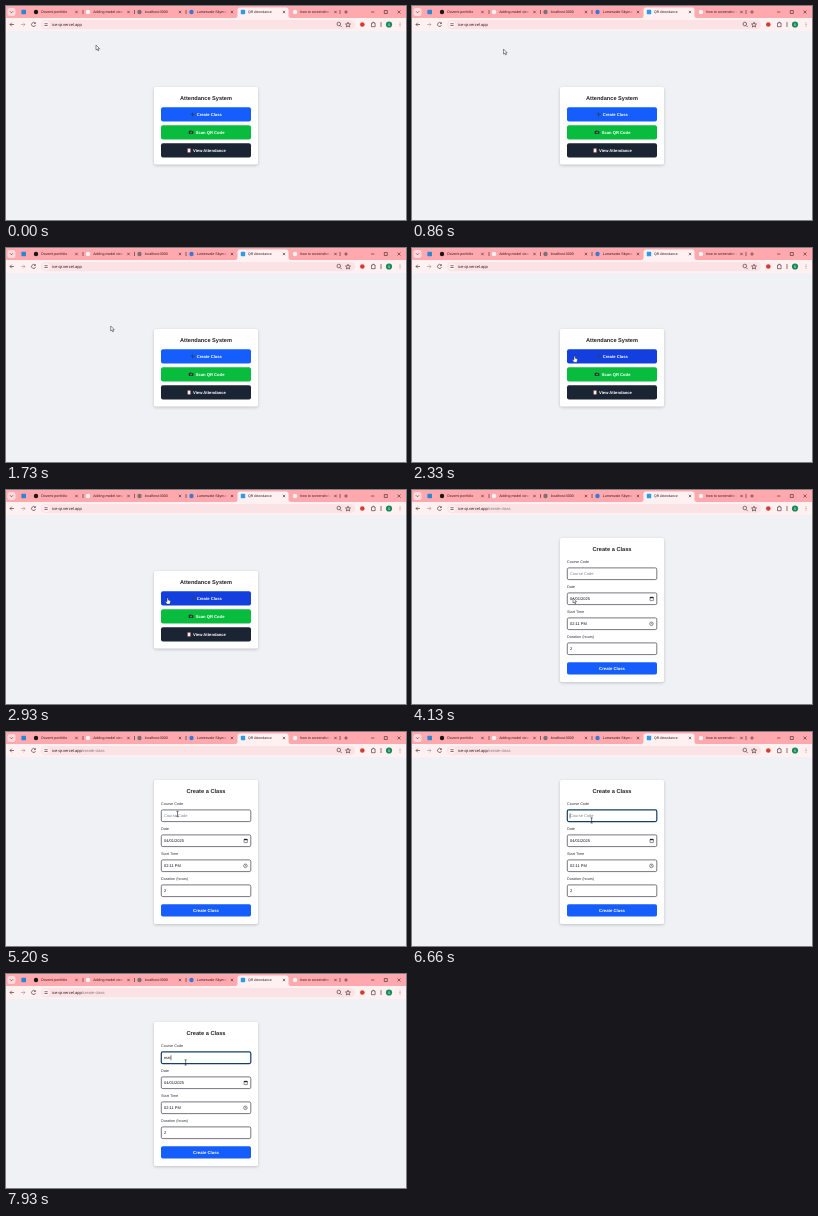
These frames come from a looping animation (400x214 px, 8 s). An HTML page:

```html
<!DOCTYPE html>
<html lang="en">
<head>
<meta charset="utf-8">
<title>Attendance System</title>
<style>
  html, body { margin: 0; height: 100%; overflow: hidden; background: #eff1f5; }
  svg { display: block; width: 100vw; height: 100vh; }
  text { font-family: "Liberation Sans", Arial, sans-serif; text-rendering: geometricPrecision; }
  .line { fill: none; stroke: #4b3034; stroke-width: .65; }
  .card { fill: #fff; filter: drop-shadow(0 1.2px 1.4px #0003); }
</style>
</head>
<body>
<svg id="stage" viewBox="0 0 400 214">
  <defs>
    <linearGradient id="fade">
      <stop offset="0" stop-color="#ffa8ae" stop-opacity="0"/>
      <stop offset="1" stop-color="#ffa8ae"/>
    </linearGradient>
  </defs>
  <g id="browser"></g>
  <g id="home"></g>
  <g id="form"></g>
  <g id="cursors">
    <path id="arrow" d="M0 0V5L1.2 4L2 5.8L2.9 5.4L2.1 3.7H3.6Z" fill="#fff" stroke="#222" stroke-width=".5"/>
    <path id="hand" d="M-.6 .2Q0 -.5 .6 .2V2L2.4 2.5Q3 2.8 2.8 3.7L2.3 6H-.8L-2.2 3.7Q-2 2.9 -1.4 3.3L-.6 4Z" fill="#fff" stroke="#222" stroke-width=".4"/>
    <path id="beam" d="M-1.1 -2.6H1.1M0 -2.6V2.6M-1.1 2.6H1.1" fill="none" stroke="#222" stroke-width=".6"/>
  </g>
</svg>
<script>
const $ = id => document.getElementById(id);
const rect = (x, y, w, h, fill, r = 0, extra = '') =>
  `<rect x="${x}" y="${y}" width="${w}" height="${h}" rx="${r}" fill="${fill}" ${extra}/>`;
const dot = (x, y, r, fill) => `<circle cx="${x}" cy="${y}" r="${r}" fill="${fill}"/>`;
const line = d => `<path class="line" d="${d}"/>`;
const text = (x, y, size, label, fill = '#222', extra = '') =>
  `<text x="${x}" y="${y}" font-size="${size}" fill="${fill}" ${extra}>${label}</text>`;
const heading = (y, size, label, fill) =>
  text(200, y, size, label, fill, 'text-anchor="middle" font-weight="700"');
const cross = (x, y, r = 1.2) => line(`M${x - r} ${y - r}L${x + r} ${y + r}M${x + r} ${y - r}L${x - r} ${y + r}`);

// Browser window
function tab(x, label, iconColor, closeX) {
  return dot(x, 6, 2.2, iconColor) + text(x + 5.2, 7.3, 3.6, label, '#33191c')
    + rect(closeX - 10, 2, 5, 8, 'url(#fade)') + rect(closeX - 5, 2, 8, 8, '#ffa8ae') + cross(closeX, 6);
}
const separators = [77, 128.5, 180, 334].map(x => line(`M${x} 4V8`)).join('');

$('browser').innerHTML =
  rect(0, 0, 400, 12, '#ffa8ae') + rect(0, 12, 400, 13, '#fff1f2') + rect(0, 25, 400, 189, '#eff1f5')
  + rect(1.5, 2, 8, 8, '#ffd9dc', 2.5) + line('M4 5.3L5.5 6.8L7 5.3')
  + rect(15.4, 3.7, 4.6, 4.6, '#2c86d8', .7)
  + tab(30, 'Dovemi portfolio', '#171717', 70.5)
  + tab(82, 'Adding model view', '#f4f4f4', 122.5)
  + tab(133.5, 'localhost:3000', '#7b7175', 174)
  + tab(185.5, 'Lumenvale Skymate: Y', '#3978d8', 226)
  + separators
  + '<path d="M229 12Q231.5 12 231.5 9.5V4Q231.5 1.5 234 1.5H280Q282.5 1.5 282.5 4V9.5Q282.5 12 285 12Z" fill="#fff1f2"/>'
  + rect(234.8, 3.8, 4.4, 4.4, '#2d9be8', .6) + text(242, 7.3, 3.5, 'QR Attendance', '#33191c') + cross(278, 6)
  + tab(289, 'how to screenshot on', '#f6f3f3', 329.5)
  + line('M338.2 6H341.8M340 4.2V7.8M365 6H368.4M378.3 4.5H381.3V7.5H378.3Z') + cross(393, 6, 1.5)
  + line('M8 18.5H4M5.8 16.7L4 18.5L5.8 20.3')
  + '<g opacity=".45">' + line('M15 18.5H19M17.2 16.7L19 18.5L17.2 20.3') + '</g>'
  + line('M29.2 17.3A2 2 0 1 0 29.5 19M29.4 16.2V17.6H28')
  + rect(35, 14, 314, 9.2, '#fbe2e4', 4.6) + dot(40, 18.6, 3.4, '#fff1f2')
  + line('M38.4 17.7H41.7M38.4 19.5H41.7')
  + text(46, 20, 4.06, 'ice-qr.vercel.app<tspan id="path" fill="#8b7478">/create-class</tspan>', '#30191c')
  + line('M334.2 19.6L335.7 21.1M334.6 18A1.8 1.8 0 1 1 331 18A1.8 1.8 0 1 1 334.6 18')
  + line('M342 16.2L342.7 17.9L344.5 18L343.1 19.2L343.6 21L342 20L340.4 21L340.9 19.2L339.5 18L341.3 17.9Z')
  + dot(356.3, 18.5, 2.3, '#d83b2d')
  + line('M365.5 17.1H366.8V16.2H368V17.1H369.1V20.7H365.5Z') + line('M375 16V21')
  + dot(383, 18.5, 3.1, '#178a58') + text(383, 19.8, 3.5, 'S', '#fff', 'text-anchor="middle"')
  + [16.9, 18.5, 20.1].map(y => dot(394, y, .45, '#4b3034')).join('');

// Start page
const button = (y, h, fill, label, x, id = '') =>
  rect(155, y, 90, h, fill, 2, id && `id="${id}"`) + text(x, y + h / 2 + 1.5, 4.15, label, '#fff', 'font-weight="700"');

$('home').innerHTML =
  rect(148, 81, 104, 77.5, '#fff', 1.8, 'class="card"') + heading(94, 5.6, 'Attendance System')
  + button(101.2, 14.3, '#155dfc', 'Create Class', 190.7, 'create')
  + '<path d="M184.7 108.4H188.5M186.6 106.5V110.3" stroke="#33425c" stroke-width=".9"/>'
  + button(119.2, 14.3, '#08bd3d', 'Scan QR Code', 189.7)
  + rect(182.7, 125, 4.6, 3.1, '#26352d', .5) + rect(183.8, 124.4, 1.5, 1, '#26352d') + dot(185, 126.6, 1, '#6c8277')
  + button(137.2, 14.3, '#1b2432', 'View Attendance', 187)
  + rect(181.4, 142.2, 3.3, 4.4, '#b8746a', .4) + rect(181.9, 142.9, 2.3, 3.3, '#f0f0f0');

// Class form
const field = (y, label, value, id = '') =>
  text(155, y - 5.3, 3.75, label, '#30343b')
  + rect(155.3, y, 89.5, 11.7, '#fff', 1.5, `stroke="#3c4048" stroke-width=".7" ${id && `id="${id}"`}`)
  + text(158, y + 7.2, 4, value, '#111', id && `id="${id}Text"`);

$('form').innerHTML =
  rect(148, 48, 104, 144, '#fff', 1.8, 'class="card"') + heading(61, 5.66, 'Create a Class')
  + field(77.9, 'Course Code', 'Course Code', 'course')
  + '<path id="caret" stroke="#111" stroke-width=".5"/>'
  + field(102.9, 'Date', '04/01/2025')
  + rect(238, 107.2, 3.4, 3.4, 'none', .3, 'stroke="#222" stroke-width=".5"') + rect(238, 107, 3.4, 1.2, '#222')
  + field(127.9, 'Start Time', '02:11 PM')
  + '<circle cx="239.4" cy="133.8" r="1.8" fill="none" stroke="#222" stroke-width=".5"/>'
  + '<path d="M239.4 132.6V134H240.4" fill="none" stroke="#222" stroke-width=".4"/>'
  + field(152.9, 'Duration (hours)', '2')
  + rect(155, 172.2, 90, 12.3, '#155dfc', 1.8) + heading(179.8, 4.25, 'Create Class', '#fff');

// Timeline
const LOOP = 8000, PAGE_CHANGE = 3870, FOCUS = 5600;
const KEYS = [[6900, 'm'], [7260, 'ma'], [7600, 'mat']];
const PATH = [
  [0, 90, 39], [700, 90, 39], [1500, 104.7, 78], [1750, 104.7, 78], [2250, 162.6, 108.3],
  [2700, 162.6, 108.3], [3100, 161, 108], [4300, 161, 108], [4900, 171.5, 82],
  [5700, 171.5, 82], [6250, 179.6, 88.4], [LOOP, 179.6, 88.4]
];

function cursorAt(t) {
  const i = PATH.findIndex(p => p[0] > t);
  const [t0, x0, y0] = PATH[i - 1], [t1, x1, y1] = PATH[i];
  const k = (t - t0) / (t1 - t0), e = k * k * (3 - 2 * k);
  return [x0 + (x1 - x0) * e, y0 + (y1 - y0) * e];
}

const show = (id, on) => { $(id).style.display = on ? '' : 'none'; };

function draw(t) {
  const [x, y] = cursorAt(t);
  const onForm = t >= PAGE_CHANGE, focused = t >= FOCUS;
  const hover = !onForm && x > 155 && y > 101.2;
  const beam = onForm && t > 4350;
  const hand = hover && t < 3450;
  show('home', !onForm);
  show('form', onForm);
  show('path', onForm);
  $('create').setAttribute('fill', hover ? '#123fdd' : '#155dfc');

  show('beam', beam);
  show('hand', hand);
  show('arrow', !beam && !hand);
  $('cursors').setAttribute('transform', `translate(${x} ${y})`);

  const [keyTime, typed] = KEYS.filter(k => k[0] <= t).pop() || [FOCUS, ''];
  const label = $('courseText');
  label.textContent = typed || 'Course Code';
  label.setAttribute('fill', typed ? '#111' : '#858991');
  $('course').setAttribute('stroke', focused ? '#173e63' : '#3c4048');
  $('course').setAttribute('stroke-width', focused ? 1.2 : .7);
  show('caret', focused && (t - keyTime) % 1060 < 530);
  const caretX = 158 + (typed && onForm ? label.getComputedTextLength() + .3 : 0);
  $('caret').setAttribute('d', `M${caretX} 81.3V86.4`);
}

const start = performance.now();
function tick() {
  draw((performance.now() - start) % LOOP);
  requestAnimationFrame(tick);
}
tick();
</script>
</body>
</html>
```
